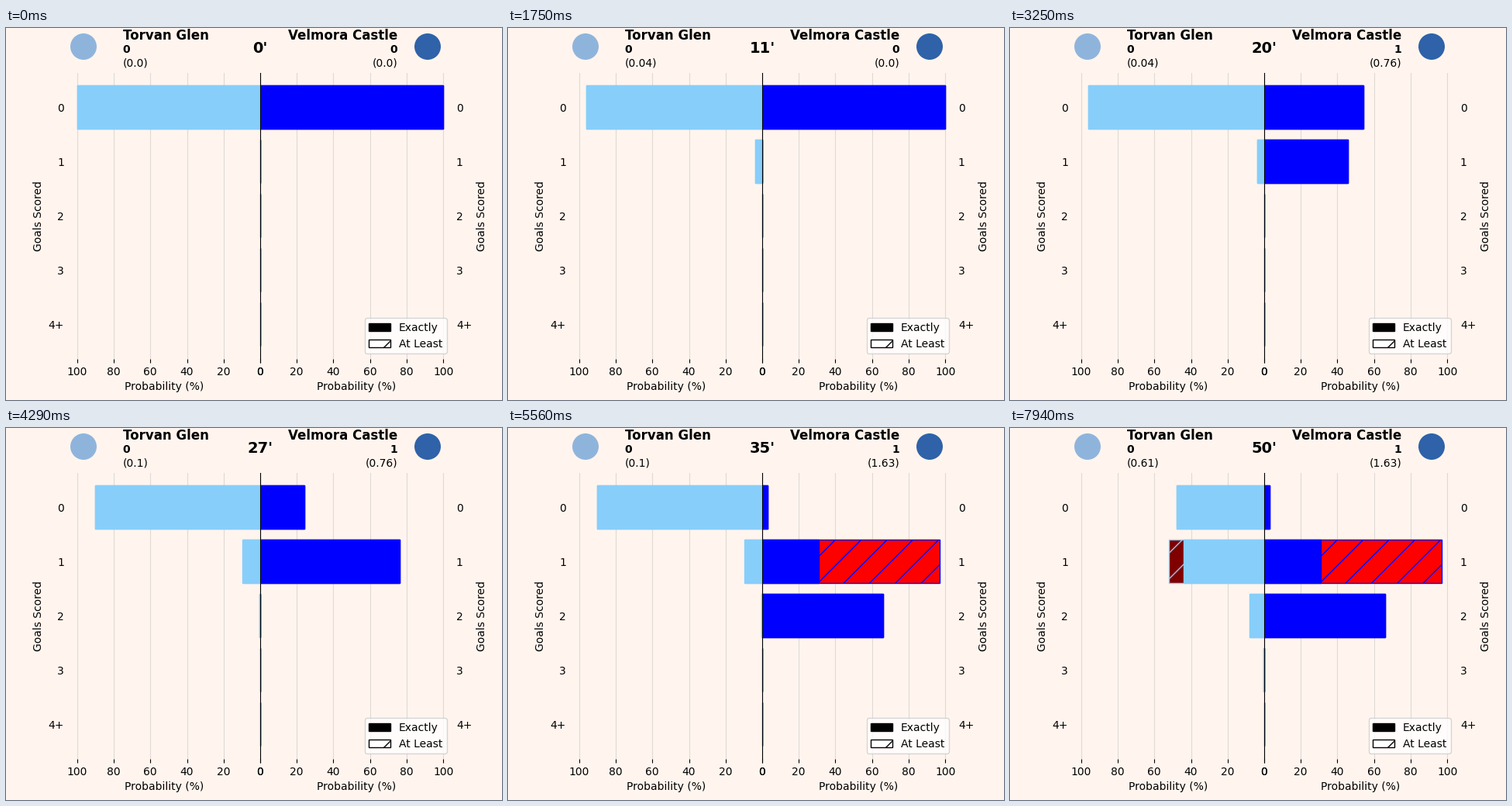
A matplotlib script for the animation above (8 s loop, 640 by 480 pixels).

```python
import numpy as np
import matplotlib.pyplot as plt
from matplotlib.animation import FuncAnimation
from matplotlib.patches import Ellipse, Patch

LOOP, STEP = 8000, 20       # ms
HOLD, TWEEN, PARTS = 160, 30, 5
ROWS = np.arange(5)
BACK = "seashell"

# minute -> (side, chances of each shot, goals scored)
SHOTS = {
    4: (0, [0.04], 0),
    20: (1, [0.76], 1),
    26: (0, [0.06], 0),
    28: (1, [0.87], 0),
    40: (0, [0.042, 0.418], 0),
    46: (0, [0.046], 0),
}
TEAMS = [
    dict(name="Torvan Glen", bar="lightskyblue", rest="maroon", ha="left"),
    dict(name="Velmora Castle", bar="blue", rest="red", ha="right"),
]


def goal_odds(shots):
    """Percent chance of 0, 1, 2, 3 and 4+ goals."""
    odds = np.array([1.0])
    for p in shots:
        odds = np.convolve(odds, [1 - p, p])
    odds = np.pad(odds, (0, 5))
    return 100 * np.append(odds[:4], odds[4:].sum())


def at_least(odds):
    total = odds[::-1].cumsum()[::-1]
    total[0] = odds[0]
    return total


def state(side, minute):
    shots, goals = [], 0
    for m, (who, chances, scored) in SHOTS.items():
        if who == side and m <= minute:
            shots += chances
            goals += scored
    return goal_odds(shots), goals, round(float(sum(shots)), 2)


def clock(t):
    """Minute on show at time t and the progress of its change."""
    minute = 0
    while True:
        span = TWEEN * PARTS if minute in SHOTS else HOLD
        if t < span:
            break
        t -= span
        minute += 1
    part = (t // TWEEN + 1) / PARTS if minute in SHOTS else 1
    return minute, part


fig, axes = plt.subplots(1, 2, figsize=(6.4, 4.8), dpi=100, facecolor=BACK)
fig.subplots_adjust(left=0.125, right=0.9, bottom=0.11, top=0.88, wspace=0)

for side, (ax, team) in enumerate(zip(axes, TEAMS)):
    ax.set_facecolor(BACK)
    ax.set_axisbelow(True)
    team["rest_bars"] = ax.barh(ROWS, 0, color=team["rest"],
                                edgecolor=team["bar"], hatch="/")
    team["bars"] = ax.barh(ROWS, 0, color=team["bar"], edgecolor=team["bar"])

    ax.set_xlim((0, 105) if side else (105, 0))
    ax.set_ylim(4.64, -0.64)
    ax.set_xticks(range(0, 101, 20))
    ax.set_yticks(ROWS, ["0", "1", "2", "3", "4+"])
    ax.grid(axis="x", alpha=0.4)
    ax.spines[:].set_visible(False)
    if side:
        ax.yaxis.tick_right()
        ax.yaxis.set_label_position("right")
        ax.spines["left"].set_visible(True)
    ax.tick_params(axis="y", length=0)
    ax.set_xlabel("Probability (%)")
    ax.set_ylabel("Goals Scored")

    ax.text(75, -1.25, team["name"], ha=team["ha"], size=12, weight="bold")
    team["goals"] = ax.text(75, -1, "", ha=team["ha"], weight="bold")
    team["xg"] = ax.text(75, -0.75, "", ha=team["ha"])

minute_text = axes[1].text(0, -1, "", ha="center", size=14, weight="bold")
axes[1].legend(loc="lower right", handles=[
    Patch(facecolor="black", edgecolor="black", label="Exactly"),
    Patch(facecolor="white", edgecolor="black", hatch="/", label="At Least"),
])

for x, color in ((100, "#8fb4dc"), (544, "#2f62a8")):
    fig.add_artist(Ellipse((x / 640, 1 - 24 / 480), 34 / 640, 34 / 480,
                           color=color, lw=0))


def draw(i):
    minute, part = clock(i * STEP + STEP // 2)
    minute_text.set_text(f"{minute}'")
    for side, team in enumerate(TEAMS):
        before = state(side, minute - 1)[0]
        after, goals, xg = state(side, minute)
        odds = before + (after - before) * part
        for bars, widths in (("bars", odds), ("rest_bars", at_least(odds))):
            for bar, width in zip(team[bars], widths):
                bar.set_width(width)
        team["goals"].set_text(str(goals))
        team["xg"].set_text(f"({float(xg)})")


anim = FuncAnimation(fig, draw, frames=LOOP // STEP, interval=STEP,
                     repeat=True, repeat_delay=0)
plt.show()
```
